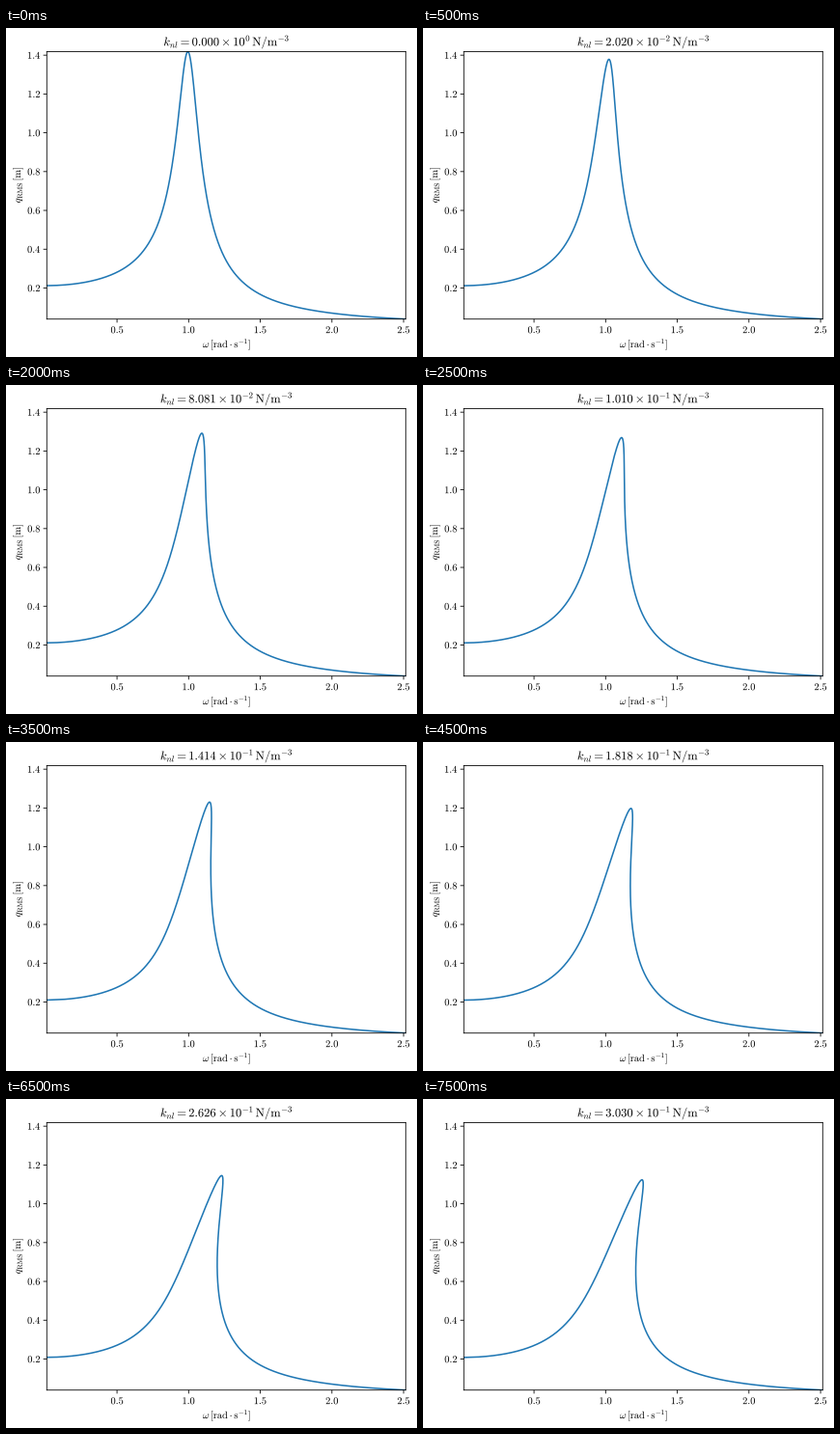
A matplotlib script that plays this animation: 426 by 341 pixels, repeating every 8000 ms.

```python
import matplotlib.pyplot as plt
import numpy as np
from matplotlib.animation import FuncAnimation
from matplotlib.lines import Line2D
from matplotlib.patches import PathPatch
from matplotlib.textpath import TextPath
from matplotlib.transforms import Affine2D

W, H, DPI = 426, 341, 75
PT = DPI / 72
LEFT, TOP, WIDTH, HEIGHT = 42.3, 24.5, 372, 277.2
BOTTOM = TOP + HEIGHT
CENTER_X, CENTER_Y = LEFT + WIDTH / 2, TOP + HEIGHT / 2
XLIM, YLIM = (0.01, 2.515), (0.0398, 1.4182)
FRAMES, INTERVAL = 16, 500
DAMPING, FORCE = 0.15, 0.3
STIFFNESS_STEP = 2 / 99

plt.rcParams["mathtext.fontset"] = "cm"


def oscillator(amp, k):
    """Stiffness, damping and third harmonic at a given fundamental amplitude."""
    den = 8 + 5.25 * k * amp ** 2
    third = k * amp ** 3 / 4 / den
    stiffness = 1 + 0.75 * k * amp * (amp + third)
    damping = DAMPING * (1 + 2.25 * k * amp * third / den)
    return stiffness, damping, third


def response(k):
    """Frequency and RMS amplitude of a harmonically forced Duffing oscillator."""
    grid = np.linspace(1, 2.5, 4001)
    s, c, _ = oscillator(grid, k)
    peak = np.interp(0, c ** 2 * s - c ** 4 / 4 - (FORCE / grid) ** 2, grid)

    t = np.linspace(0, np.pi, 8001)
    amp = 0.05 + (peak - 0.05) * np.sin(t)
    s, c, third = oscillator(amp, k)
    mid = s - c ** 2 / 2
    root = np.sqrt(np.maximum(mid ** 2 - s ** 2 + (FORCE / amp) ** 2, 0))
    omega2 = mid + np.where(t < np.pi / 2, -root, root)
    return np.sqrt(np.maximum(omega2, 0)), np.sqrt((amp ** 2 + third ** 2) / 2)


def title_text(k):
    mantissa, exponent = f"{k:.3e}".split("e")
    return (rf"$k_{{nl}} = {mantissa} \times 10^{{{int(exponent)}}}"
            r"\,\mathrm{N/m}^{-3}$")


def outline(x, y, text, size=10, align=0.5, angle=0):
    """Text as a path in pixels, anchored on its baseline."""
    path = TextPath((0, 0), text, size=size * PT)
    box = path.get_extents()
    shift = -(box.x0 + align * box.width)
    return Affine2D().translate(shift, 0).rotate_deg(angle).translate(
        x, H - y).transform_path(path)


fig = plt.figure(figsize=((W + 1e-6) / DPI, (H + 1e-6) / DPI), dpi=DPI)
pixels = Affine2D().scale(1 / DPI) + fig.dpi_scale_trans


def label(*args, **kwargs):
    patch = PathPatch(outline(*args, **kwargs), fc="black", lw=0,
                      snap=False, transform=pixels)
    return fig.add_artist(patch)


def tick(x, y, dx, dy):
    fig.add_artist(Line2D([x, x + dx], [H - y, H - y - dy], lw=0.8, color="black",
                          solid_capstyle="butt", snap=False, transform=pixels))


ax = fig.add_axes([LEFT / W, 1 - BOTTOM / H, WIDTH / W, HEIGHT / H])
ax.set(xlim=XLIM, ylim=YLIM, xticks=[], yticks=[])
for spine in ax.spines.values():
    spine.set_snap(False)

TICK, GAP = 3.5 * PT, 7 * PT
for value in np.arange(0.5, 2.6, 0.5):
    x = LEFT + WIDTH * (value - XLIM[0]) / (XLIM[1] - XLIM[0])
    tick(x, BOTTOM, 0, TICK)
    label(x, BOTTOM + GAP + 7.2, f"${value:.1f}$")
for value in np.arange(0.2, 1.5, 0.2):
    y = BOTTOM - HEIGHT * (value - YLIM[0]) / (YLIM[1] - YLIM[0])
    tick(LEFT, y, -TICK, 0)
    label(LEFT - GAP, y + 3.6, f"${value:.1f}$", align=1)

label(CENTER_X, BOTTOM + 29.3, r"$\omega\,[\mathrm{rad}\cdot\mathrm{s}^{-1}]$")
label(15, CENTER_Y, r"$q_{\mathrm{RMS}}\,[\mathrm{m}]$", angle=90)
title = label(CENTER_X, TOP - 6 * PT, title_text(0), size=12)
line, = ax.plot([], [], lw=1.5, color="C0")


def update(i):
    k = i * STIFFNESS_STEP
    line.set_data(*response(k))
    title.set_path(outline(CENTER_X, TOP - 6 * PT, title_text(k), size=12))
    return line, title


anim = FuncAnimation(fig, update, frames=FRAMES, interval=INTERVAL,
                     repeat=True, repeat_delay=0)
plt.show()
```
